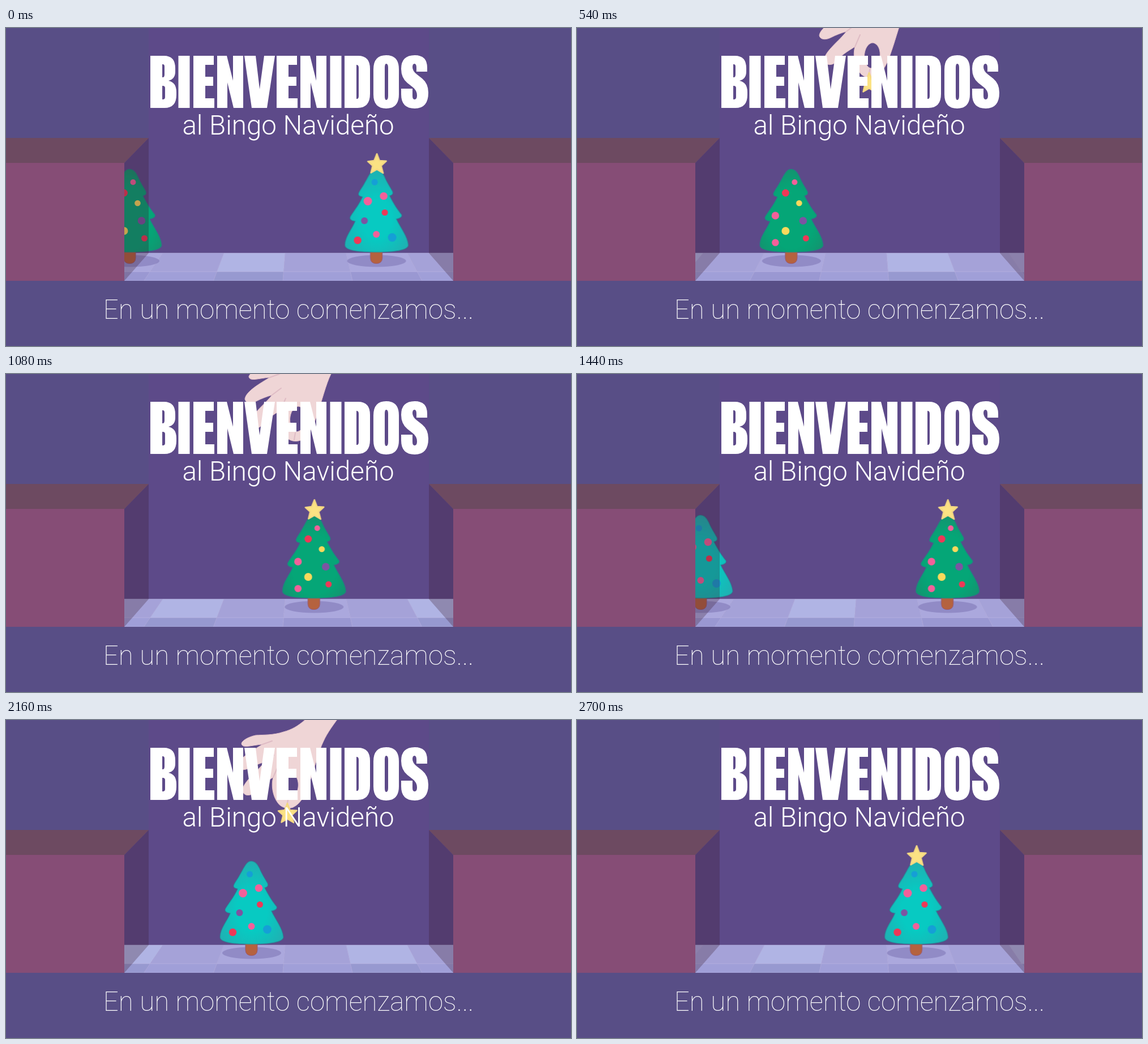
These frames come from a looping animation (998x561 px, 2.88 s). An HTML page:

```html
<!DOCTYPE html>
<html lang="es">
<head>
<meta charset="utf-8">
<title>Bingo Navideño</title>
<style>
  html, body { margin: 0; width: 100%; height: 100%; overflow: hidden; background: #584e86; }
  svg { display: block; width: 100vw; height: 100vh; }
  text { font-family: Roboto, sans-serif; fill: #fff; text-anchor: middle; font-size: 47.5px; }

  /* Everything advances in beats of 180 ms: 16 beats per loop. */
  .tree { animation: ride 2880ms steps(16) infinite; }
  .tree .pass { animation: pass 2880ms step-end infinite; }
  .tree .topper { animation: topper 2880ms step-end infinite; }
  .tree.teal, .teal .pass, .teal .topper { animation-delay: -1440ms; }
  #hand { animation: reach 1440ms step-end infinite; }
  #held { animation: held 1440ms step-end infinite; }
  .floor { visibility: hidden; animation: beat 1440ms step-end infinite; }

  @keyframes ride { from { transform: translateX(213.4px); } to { transform: translateX(1095.8px); } }
  @keyframes pass {
    0% { transform: translateX(5.5px); opacity: 1; }
    6.25% { transform: none; opacity: 1; }
    68.75%, 100% { transform: none; opacity: 0; }
  }
  @keyframes topper {
    0%, 100% { visibility: hidden; }
    31.25% { visibility: visible; }
  }
  @keyframes reach {
    0%, 87.5%, 100% { transform: translate(0, -400px); }
    37.5% { transform: translate(26px, -143px); }
    50% { transform: translate(7px, -75px); }
    62.5% { transform: none; }
    75% { transform: translate(20px, -112px); }
  }
  @keyframes held {
    0% { visibility: visible; }
    75%, 100% { visibility: hidden; }
  }
  @keyframes beat {
    0% { visibility: visible; }
    12.5%, 100% { visibility: hidden; }
  }
</style>
</head>
<body>
<svg viewBox="0 0 998 561" preserveAspectRatio="none">
  <defs>
    <clipPath id="room"><rect x="209" width="581" height="446"/></clipPath>
    <radialGradient id="green" cx=".5" cy=".6" r=".6">
      <stop offset=".6" stop-color="#05a677"/><stop offset="1" stop-color="#13946f"/>
    </radialGradient>
    <radialGradient id="teal" cx=".5" cy=".6" r=".6">
      <stop offset=".4" stop-color="#07cac2"/><stop offset="1" stop-color="#20b0b2"/>
    </radialGradient>
    <path id="body" d="M-1 249C-10 249-14 262-21 273C-25 281-32 289-32 293C-32 297-27 297-25 298C-30 310-39 321-46 332C-49 337-45 340-38 341C-43 354-56 368-56 383C-56 393-30 395.500 0 395.500C30 395.500 56 392 56 383C55 368 42 352 35 337C41 336 46 333 44 329C38 322 30 310 23 296C27 295 30 293 28 288C24 281 17 270 14 262C10 254 6 249-1 249Z"/>
    <path id="star" d="M0-18L4.6-6L16.5-5.2L7.5 3L11 16L0 9.5L-10.5 15.5L-7.5 3L-16-4.6L-4.8-6Z"
      fill="#fbe283" stroke="#f4d883" stroke-width="2.5" stroke-linejoin="round"/>
    <g id="side">
      <path d="M209 238L252 194V397L209 446Z" fill="#391b2d" fill-opacity=".28"/>
      <path d="M0 194H252L209 238H0Z" fill="#6d4a61"/>
      <path d="M0 238H209V446H0Z" fill="#864d76"/>
    </g>
    <path id="I" d="M0 49H20V141H0Z"/>
    <path id="E" d="M0 49H36V65H21V86H35V102H21V124H37V141H0Z"/>
    <path id="N" d="M0 49H17L28 93V49H46V141H29L18 96V141H0Z"/>
  </defs>

  <rect width="998" height="561" fill="#584e86"/>
  <rect x="252" width="495" height="200" fill="#5d4a89"/>
  <rect x="209" y="194" width="581" height="204" fill="#5d4a89"/>

  <g clip-path="url(#room)">
    <g id="floors"></g>
    <g id="trees"></g>
    <g id="hand">
      <path fill="#efd5d6" fill-rule="evenodd" stroke="#e3c3ca" stroke-width="1" d="M640-6L574-6C560 30 540 62 521 75C508 86 498 92 483 96C465 102 448 101 434 102C420 105 409 112 409 117C411 126 428 119 446 118C430 128 404 142 402 156C403 163 412 165 422 160C432 155 440 152 450 149C438 165 412 184 411 198C411 208 421 210 429 205C440 191 452 184 465 176C461 190 464 209 473 221C480 231 492 232 500 229C516 222 524 200 529 185C538 160 545 130 554 112C566 85 602 45 640-6Z
        M497 169C509 172 512 189 507 202C503 211 497 214 492 214C484 211 480 198 482 187C484 176 490 169 497 169Z"/>
      <path d="M446 118L463 112M450 149L466 137M465 176L474 155M491 216L489 228" fill="none" stroke="#dfbcc5" stroke-width="2" stroke-linecap="round"/>
      <use id="held" href="#star" x="490" y="240"/>
    </g>
  </g>

  <use href="#side"/>
  <use href="#side" transform="translate(999) scale(-1 1)"/>

  <!-- Selectable word behind the drawn display lettering -->
  <text x="500" y="125" font-weight="900" style="fill:transparent">BIENVENIDOS</text>
  <g fill="#fff" fill-rule="evenodd" aria-hidden="true">
    <path d="M255 49H279Q299 49 299 71V77Q299 90 287 93Q301 96 301 113V118Q301 141 280 141H255ZM276 64V87H277Q280 87 280 82V68Q280 64 277 64ZM276 102V126H277Q281 126 281 122V106Q281 102 277 102Z"/>
    <use href="#I" x="304.500"/>
    <use href="#E" x="331"/>
    <use href="#N" x="373"/>
    <path d="M421 49H441L448 108L456 49H475L461 141H434Z"/>
    <use href="#E" x="478"/>
    <use href="#N" x="520"/>
    <use href="#I" x="572.500"/>
    <path d="M598 49H622Q643 49 643 72V116Q643 141 621 141H598ZM619 65V125H620Q623 125 623 120V70Q623 65 619 65Z"/>
    <path d="M671.5 48Q694 48 694 73V117Q694 142 671.5 142Q649 142 649 117V73Q649 48 671.5 48ZM671.5 63Q669 63 669 70V120Q669 127 671.5 127Q675 127 675 120V70Q675 63 671.5 63Z"/>
    <path d="M722 48Q744 48 744 70V77H725V70Q725 63 721.5 63Q718 63 718 69Q718 76 726 82L735 89Q746 98 746 114Q746 142 722 142Q698 142 698 117V107H718V120Q718 126 722 126Q726 126 726 119Q726 110 718 104L709 97Q698 88 698 72Q698 48 722 48Z"/>
  </g>
  <text x="498.500" y="187.500" font-weight="300">al Bingo Navideño</text>
  <text x="499" y="512.500" font-weight="100">En un momento comenzamos...</text>
</svg>

<script>
  const PINK = '#f3609a', RED = '#ee3857', GOLD = '#f8d95c', PLUM = '#7c54a2', BLUE = '#159fd6';

  // Each bauble: x, y, radius, colour
  const baubles = {
    green: [
      [5.5, 272, 5, PINK], [-10.5, 291, 6.5, RED], [13.5, 309, 5.3, GOLD], [-28.5, 331, 6.7, PINK],
      [20.5, 340, 6.8, PLUM], [-10.5, 358, 7, GOLD], [25.5, 371, 5.5, RED], [-28.5, 378.5, 6.3, PINK]
    ],
    teal: [
      [-3.5, 272, 5.5, BLUE], [12.5, 296.5, 6.8, PINK], [-15.5, 305.5, 7.5, PINK], [14.5, 325.5, 5.5, RED],
      [-21.5, 340, 6, PLUM], [-0.5, 364, 6, PINK], [27.5, 369.5, 7.5, BLUE], [-33.5, 374.5, 6.7, RED]
    ]
  };

  const tree = kind => `
    <g class="tree ${kind}"><g class="pass">
      <ellipse cy="411" rx="52" ry="10.5" fill="#8079b8" fill-opacity=".6"/>
      <path d="M-11 393H10V406Q9.5 415.5 -0.5 415.5Q-10.5 415.5 -11 406Z" fill="#b5623f" stroke="#99566a" stroke-width="1"/>
      <use href="#body" fill="url(#${kind})" stroke="#247f8c" stroke-opacity=".35" stroke-width="2"/>
      ${baubles[kind].map(([x, y, r, c]) => `<circle cx="${x}" cy="${y}" r="${r}" fill="${c}"/>`).join('')}
      <use class="topper" href="#star" x="0.5" y="240"/>
    </g></g>`;

  const FAR = 397, MID = 430, NEAR = 446;
  const back = ['#b0b4e4', '#a5a2d8', '#aba8dd', '#a5a2d8'];
  const front = ['#9799d0', '#a09fd8', '#9a98d2', '#a09fd8'];

  // Floor lines fan out from x = 520 toward the viewer.
  const fan = (x, y) => `${(520 + (x - 520) * (1 + (y - FAR) * 0.0028)).toFixed(1)} ${y}`;
  const slab = (x, y1, y2, fill) =>
    `<path d="M${fan(x, y1)}L${fan(x + 108, y1)}L${fan(x + 108, y2)}L${fan(x, y2)}Z" fill="${fill}"/>`;

  function floor(beat) {
    let tiles = '';
    for (let n = -8; n < 5; n++) {
      const x = 385 + 54 * beat + 108 * n, tone = (n + 8) % 4;
      tiles += slab(x, FAR, MID, back[tone]) + slab(x, MID, NEAR, front[tone]);
    }
    return `<g class="floor" style="animation-delay:${beat * 180 - 1440}ms" stroke="#b9b3e2" stroke-opacity=".5">${tiles}</g>`;
  }

  document.getElementById('floors').innerHTML = [...Array(8).keys()].map(floor).join('');
  document.getElementById('trees').innerHTML = tree('green') + tree('teal');
</script>
</body>
</html>
```
